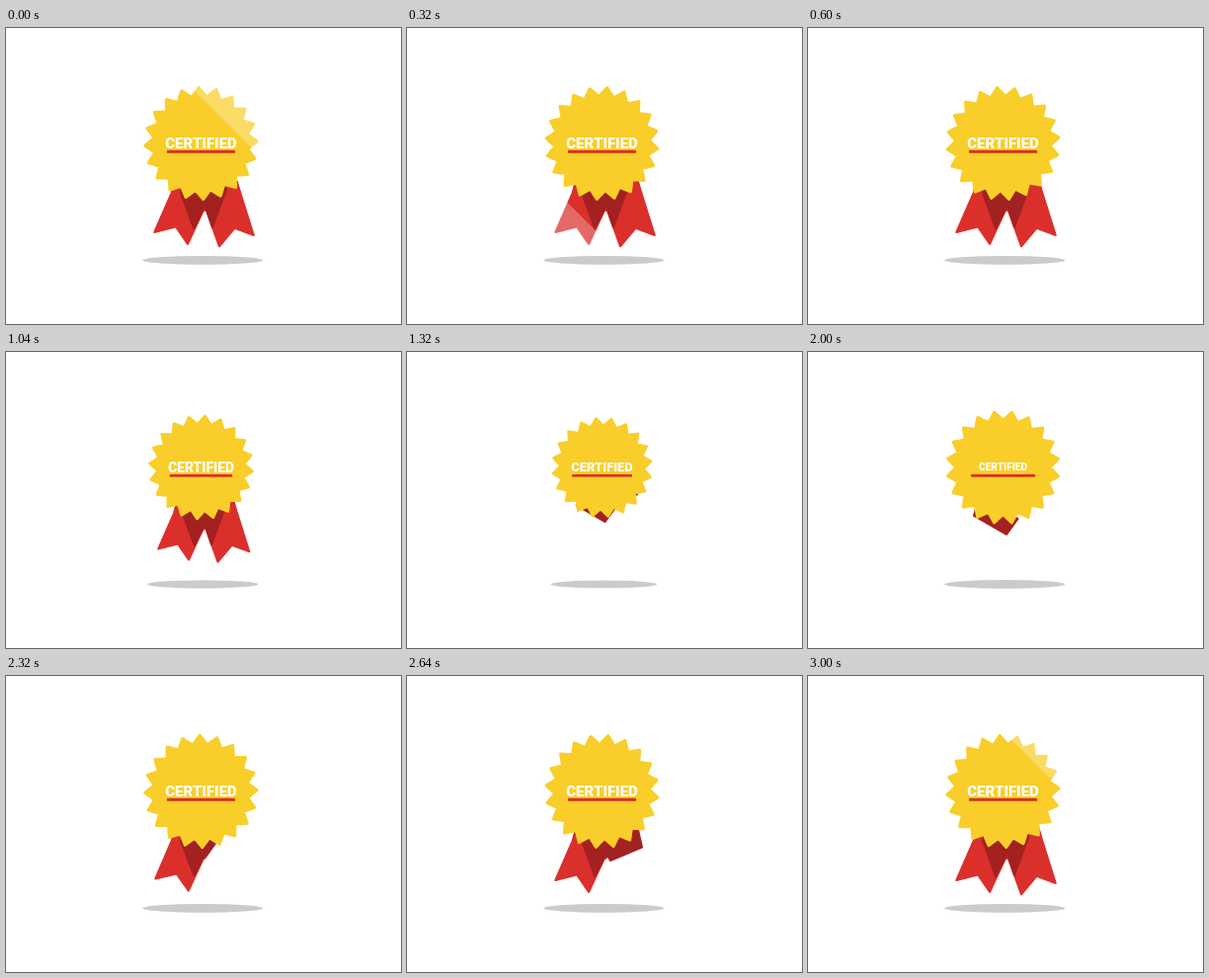
Write an HTML page with a canvas that moves like this. It is 400 px wide and 300 px high and loops after 3.04 s.

```html
<!DOCTYPE html>
<html lang="en">
<head>
<meta charset="utf-8">
<title>Certified badge</title>
<style>
html, body { margin: 0; width: 100%; height: 100%; overflow: hidden; background: #fff; }
canvas { display: block; }
</style>
</head>
<body>
<canvas id="stage" width="400" height="300"></canvas>
<script>
const ctx = document.getElementById('stage').getContext('2d');
const LOOP = 3040, CX = 197.5, CY = 117;
const YELLOW = '#f9ce2a', RED = '#db2f2c', DARK = '#a32121';

const ease = u => u < 0.5 ? 2 * u * u : 1 - 2 * (1 - u) * (1 - u);
const ramp = (t, from, to) => ease(Math.min(1, Math.max(0, (t - from) / (to - from))));
// 1 at rest, folds away during the first span and comes back during the second
const visible = (t, out0, out1, in0, in1) => 1 - ramp(t, out0, out1) + ramp(t, in0, in1);

function poly(points, color, round = 2) {
  ctx.beginPath();
  points.forEach(([x, y]) => ctx.lineTo(x, y));
  ctx.closePath();
  ctx.fillStyle = ctx.strokeStyle = color;
  ctx.lineJoin = 'round';
  ctx.lineWidth = round;
  ctx.fill();
  if (round) ctx.stroke();
}

function scaled(x, y, s, draw) {
  ctx.save();
  ctx.translate(x, y);
  ctx.scale(s, s);
  draw();
  ctx.restore();
}

// Flattens points towards the fold line a-b; k = 1 is fully open
function unfold(points, a, b, k) {
  const dx = b[0] - a[0], dy = b[1] - a[1], len2 = dx * dx + dy * dy;
  return points.map(([x, y]) => {
    const u = ((x - a[0]) * dx + (y - a[1]) * dy) / len2;
    const px = a[0] + u * dx, py = a[1] + u * dy;
    return [px + k * (x - px), py + k * (y - py)];
  });
}

// top reaches under the star so that no gap shows between its teeth
const left = {
  a: [169.5, 163], b: [201, 182.5], top: [182, 150],
  strip: [[168, 166], [201, 185], [212.5, 169], [172, 152]],
  tail: [[150.3, 207], [172, 201.5], [184, 219]],
  shade: [[177, 167], [190, 203], [200.5, 182.5], [201, 155], [180, 152]]
};
const right = {
  a: [234.5, 158], b: [202, 182.5], top: [222, 150],
  strip: [[202, 180], [206, 187], [238, 173.5], [234, 156], [222, 150]],
  tail: [[250.8, 210], [231.5, 202.8], [216, 221.3]],
  shade: [[202.5, 182.5], [209, 202], [223, 164], [222, 152], [204, 160]]
};

function ribbon(r, strip, open) {
  if (strip <= 0) return;
  poly(r.strip.map(([x, y]) => [x, y - 30 * (1 - strip)]), DARK);
  if (open <= 0) return;
  poly(unfold([r.a, ...r.tail, r.b, r.top], r.a, r.b, open), RED);
  poly(unfold(r.shade, r.a, r.b, open), DARK);
}

function star(angle) {
  const points = [];
  for (let i = 0; i < 40; i++) {
    const a = angle + i * Math.PI / 20, radius = i % 2 ? 47.7 : 56.7;
    points.push([CX + radius * Math.sin(a), CY - radius * Math.cos(a)]);
  }
  poly(points, YELLOW, 3);
}

function shine(t) {
  const u = ((t - 2850 + LOOP) % LOOP) / 730;
  if (u >= 1) return;
  const edge = 165 - 275 * ease(u), end = edge + 46;
  // Diagonal band between the lines x - y = edge and x - y = end
  poly([[edge, 0], [end, 0], [end + 300, 300], [edge + 300, 300]], 'rgba(255,255,255,.28)', 0);
}

function draw(t) {
  ctx.clearRect(0, 0, 400, 300);
  const size = 1 - 0.12 * (ramp(t, 850, 1170) - ramp(t, 1670, 1990));

  scaled(CX, CY, size, () => {
    ctx.translate(-CX, -CY);
    ribbon(left, visible(t, 1280, 1420, 1850, 2000), visible(t, 1120, 1320, 2080, 2360));
    ribbon(right, visible(t, 1220, 1360, 2420, 2620), visible(t, 1060, 1260, 2660, 2900));
    star((-2.3 + 72 * t / LOOP) * Math.PI / 180);
  });
  scaled(CX, 125.3, size * visible(t, 1460, 1710, 1720, 2060), () => {
    ctx.fillStyle = '#d8321f';
    ctx.fillRect(-34.5, -1.5, 69, 3);
  });
  scaled(CX, 116.8, size * visible(t, 1300, 1500, 1840, 2110), () => {
    ctx.font = '900 15px Roboto, "Open Sans", sans-serif';
    ctx.textAlign = 'center';
    ctx.fillStyle = '#fff';
    ctx.fillText('CERTIFIED', 0, 5.3);
  });

  ctx.globalCompositeOperation = 'source-atop';
  shine(t);
  ctx.globalCompositeOperation = 'destination-over';
  ctx.beginPath();
  ctx.ellipse(199.2, 235.4, 61 * size, 4.4 * size, 0, 0, 2 * Math.PI);
  ctx.fillStyle = '#cbcbcb';
  ctx.fill();
  ctx.globalCompositeOperation = 'source-over';
}

const start = performance.now();
function tick() {
  draw((performance.now() - start) % LOOP);
  requestAnimationFrame(tick);
}
tick();
</script>
</body>
</html>
```
